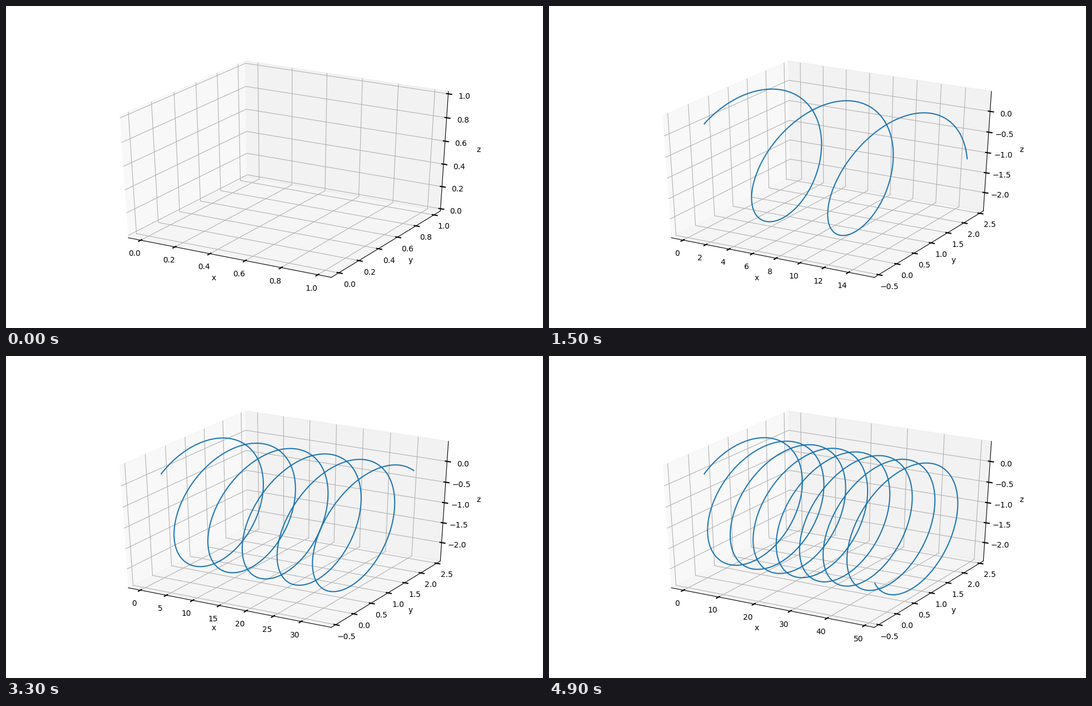
These frames come from a looping animation (966 px wide and 580 px high, 5000 ms). A matplotlib script:

```python
import numpy as np
import matplotlib.pyplot as plt
from matplotlib.animation import FuncAnimation
from matplotlib.ticker import MaxNLocator

FRAMES = 50
INTERVAL = 100
STEPS_PER_FRAME = 20
WALL_PAD = 1 / 48  # gap between the axis limits and the walls

plt.rcParams.update({
    "font.family": "DejaVu Sans",
    "xtick.major.width": 1.5,
    "ytick.major.width": 1.5,
})

fig = plt.figure(figsize=(9.66, 5.8), dpi=100)
ax = fig.add_subplot(projection="3d")
ax.view_init(elev=30, azim=-60)
# A unit cube stretched over the full, non-square axes area.
ax.set_box_aspect((1, 1, 1), zoom=np.sqrt(3) / 1.8294640721620434)
ax.apply_aspect = lambda position=None: None
ax.set(xlabel="x", ylabel="y", zlabel="z")

curve, = ax.plot([], [], [], color="#1f77b4", lw=1.5)
locator = MaxNLocator(9, steps=[1, 2, 2.5, 5, 10])


def helix(end):
    """Path of a charge with velocity (1, 1, 1) circling a field along x."""
    t = np.arange(1, end * STEPS_PER_FRAME + 1) / STEPS_PER_FRAME
    return t, 1 + np.sin(t) - np.cos(t), np.sin(t) + np.cos(t) - 1


def fit_axis(axis, set_limits, values, margin):
    low, high = (values.min(), values.max()) if values.size else (0.0, 1.0)
    extra = margin * (high - low)
    low, high = low - extra, high + extra
    pad = WALL_PAD * (high - low)
    ticks = locator.tick_values(low, high)
    set_limits(low - pad, high + pad)
    axis.set_ticks(ticks[(ticks >= low) & (ticks <= high)])


def update(frame):
    x, y, z = helix(frame)
    curve.set_data_3d(x, y, z)
    fit_axis(ax.xaxis, ax.set_xlim, x, 0.05)
    fit_axis(ax.yaxis, ax.set_ylim, y, 0.05)
    fit_axis(ax.zaxis, ax.set_zlim, z, 0)
    return curve,


anim = FuncAnimation(fig, update, frames=FRAMES, interval=INTERVAL,
                     init_func=lambda: update(0), repeat=True, repeat_delay=0)
plt.show()
```
